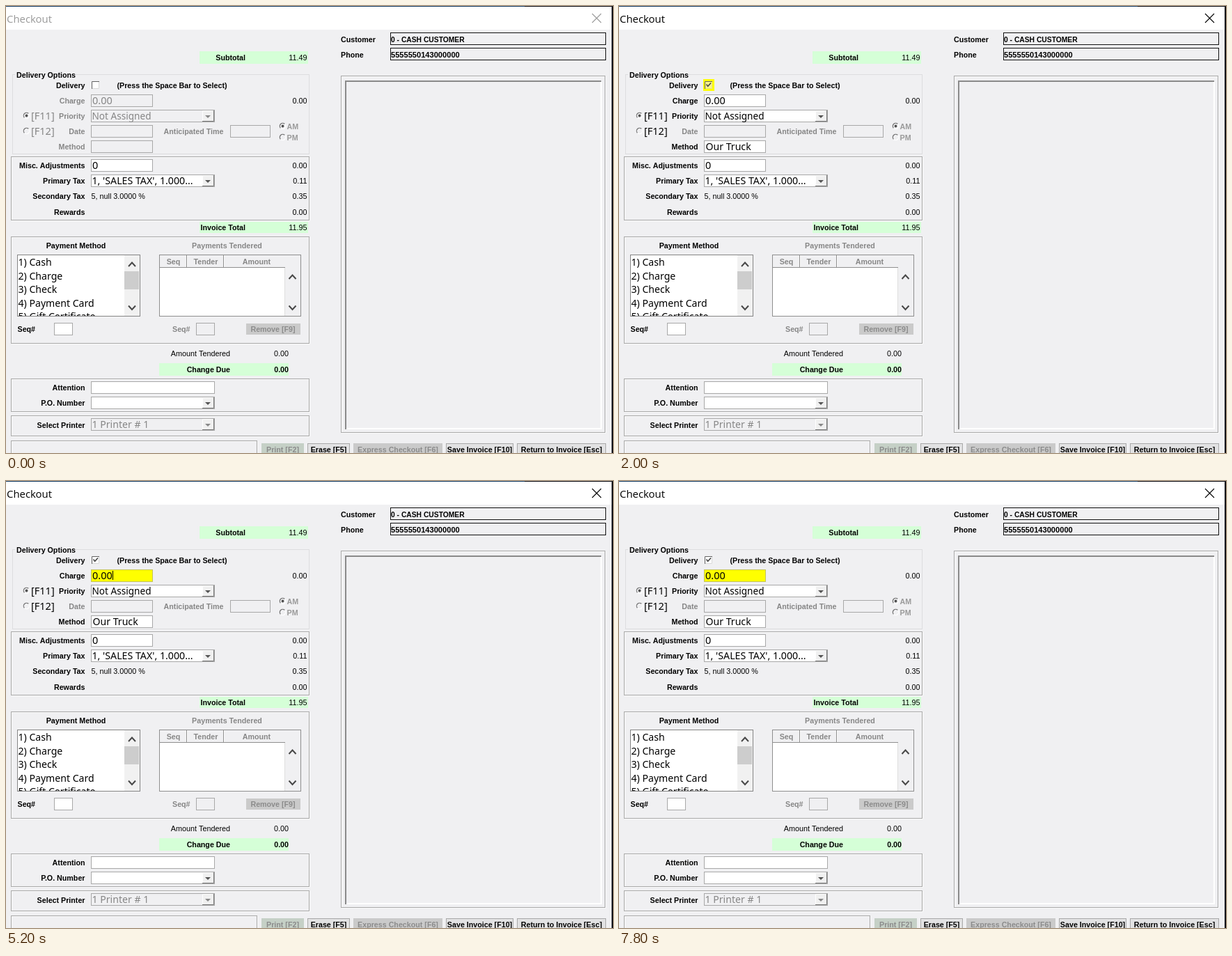
These frames come from a looping animation (872x642 px, 8000 ms). An HTML page with a canvas:

```html
<!DOCTYPE html>
<html lang="en">
<head>
<meta charset="utf-8">
<title>Checkout</title>
<style>
html, body { margin: 0; width: 872px; height: 642px; overflow: hidden; background: #f0f0f2; }
canvas { display: block; }
</style>
</head>
<body>
<canvas id="stage" width="872" height="642"></canvas>
<script>
const ctx = document.getElementById('stage').getContext('2d', { alpha: false });
const LOOP = 8000;
const BG = '#f0f0f2', GREEN = '#d5ffd7', INK = '#000', DIM = '#868686', EDGE = '#a8a8a8', YELLOW = '#ffff00';
const LABEL = '"Liberation Sans", Arial, sans-serif';
const FIELD = '"Noto Sans", "Open Sans", sans-serif';

function fill(x, y, w, h, color) {
  ctx.fillStyle = color;
  ctx.fillRect(x, y, w, h);
}

function frame(x, y, w, h, color) {
  ctx.strokeStyle = color;
  ctx.lineWidth = 1;
  ctx.strokeRect(x + 0.5, y + 0.5, w - 1, h - 1);
}

function path(points, color, width) {
  ctx.beginPath();
  points.forEach(([x, y], i) => i ? ctx.lineTo(x, y) : ctx.moveTo(x, y));
  ctx.strokeStyle = color;
  ctx.lineWidth = width;
  ctx.stroke();
}

function write(text, x, y, font, color, align) {
  ctx.font = font;
  ctx.fillStyle = color;
  ctx.textAlign = align;
  ctx.fillText(text, x, y);
}

const bold = (s, x, y, color = INK, align = 'left', size = 10.7) =>
  write(s, x, y, `bold ${size}px ${LABEL}`, color, align);
const plain = (s, x, y, color = INK, align = 'left') =>
  write(s, x, y, `10.8px ${LABEL}`, color, align);
const big = (s, x, y, color = INK, size = 14.1) =>
  write(s, x, y, `${size}px ${FIELD}`, color, 'left');
const label = (s, y, color) => bold(s, 113.5, y, color, 'right');
const amount = (s, y) => plain(s, 432.5, y, INK, 'right');

function group(x, y, w, h) {
  frame(x + 1, y + 1, w, h, '#fafafa');
  frame(x, y, w, h, EDGE);
}

function box(x, y, w, h, enabled, color = '#fff') {
  fill(x, y, w, h, enabled ? color : BG);
  frame(x, y, w, h, color === YELLOW ? '#c4c45a' : EDGE);
}

function combo(y, text, enabled, size) {
  box(122, y, 178, 18, enabled);
  fill(282, y + 1, 17, 16, '#f0f0f0');
  path([[282.5, y + 17], [282.5, y + 1.5], [298, y + 1.5]], '#fff', 1);
  path([[282, y + 16.5], [298.5, y + 16.5], [298.5, y + 1]], '#777', 1);
  ctx.fillStyle = enabled ? '#555' : '#888';
  ctx.beginPath();
  ctx.moveTo(286, y + 8);
  ctx.lineTo(294, y + 8);
  ctx.lineTo(290, y + 12);
  ctx.fill();
  big(text, 123.5, y + 14, enabled ? INK : DIM, size);
}

function radio(x, y, on) {
  ctx.lineWidth = 1.2;
  for (const [from, color] of [[0.75, '#707070'], [1.75, '#fff']]) {
    ctx.strokeStyle = color;
    ctx.beginPath();
    ctx.arc(x, y, 4.2, from * Math.PI, (from + 1) * Math.PI);
    ctx.stroke();
  }
  if (on) {
    ctx.fillStyle = '#505050';
    ctx.beginPath();
    ctx.arc(x, y, 1.9, 0, 7);
    ctx.fill();
  }
}

function chevron(x, y, dir) {
  path([[x - 5, y + 3 * dir], [x, y - 2.5 * dir], [x + 5, y + 3 * dir]], '#484848', 2);
}

function button(x, w, text, enabled, color = '#cacaca') {
  fill(x, 628, w, 14, enabled ? '#e2e2e3' : color);
  if (enabled) frame(x, 628, w, 20, '#a9a9a9');
  bold(text, x + w / 2, 641, enabled ? INK : '#8b8b8b', 'center');
}

function checkbox(focused, checked) {
  if (focused) fill(121, 105, 16, 17, YELLOW);
  fill(123, 108, 11, 11, !focused ? '#fff' : checked ? '#fbf58c' : YELLOW);
  path([[123.5, 119], [123.5, 108.5], [134, 108.5]], '#626262', 1);
  path([[124, 118.5], [133.5, 118.5], [133.5, 109]], focused ? '#e6e08a' : '#d8d8d8', 1);
  if (checked) path([[125.5, 112.5], [127.7, 115.2], [132, 110.5]], '#444', 1.6);
}

function header(active) {
  fill(0, 0, 872, 34, '#fff');
  const ink = active ? INK : '#999';
  write('Checkout', 1, 24, '14.9px "Open Sans", "Noto Sans", sans-serif', ink, 'left');
  path([[842, 11], [855, 24]], ink, 1.1);
  path([[855, 11], [842, 24]], ink, 1.1);
}

function delivery(s) {
  frame(9, 98, 427, 115, '#dddddf');
  fill(13, 94, 86, 10, BG);
  bold('Delivery Options', 15, 103);
  label('Delivery', 118);
  checkbox(s.focus === 'delivery', s.checked);
  bold('(Press the Space Bar to Select)', 159.5, 118);

  const ink = s.checked ? INK : DIM;
  label('Charge', 140, ink);
  box(122, 127, 89, 18, s.checked, s.focus === 'charge' ? YELLOW : '#fff');
  big('0.00', 124, 141, ink, 14.5);
  if (s.caret) fill(153, 129, 1, 13, INK);
  amount('0.00', 140);

  radio(29.5, 157.5, true);
  radio(29.5, 179.5, false);
  big('[F11]', 36, 163, ink, 14.5);
  big('[F12]', 36, 185, ink, 14.5);
  label('Priority', 162, ink);
  combo(149, 'Not Assigned', s.checked, 13.6);

  label('Date', 184, DIM);
  box(122, 171, 89, 18, false);
  bold('Anticipated Time', 312.5, 184, DIM, 'right');
  box(322, 171, 58, 18, false);
  radio(397.5, 172.5, true);
  radio(397.5, 188.5, false);
  bold('AM', 403.5, 177, '#9a9a9a');
  bold('PM', 403.5, 193, '#9a9a9a');

  label('Method', 206, ink);
  box(122, 193, 89, 18, s.checked);
  if (s.checked) big('Our Truck', 124.5, 207);
}

function totals() {
  fill(278, 65, 156, 18, GREEN);
  bold('Subtotal', 344, 78, INK, 'right');
  amount('11.49', 78);

  group(7, 216, 429, 92);
  label('Misc. Adjustments', 233);
  box(122, 220, 89, 18, true);
  big('0', 124, 234, INK, 14.5);
  amount('0.00', 233);
  label('Primary Tax', 255);
  combo(242, "1, 'SALES TAX', 1.000...", true, 14.2);
  amount('0.11', 255);
  label('Secondary Tax', 277);
  plain('5, null 3.0000 %', 122.5, 277);
  amount('0.35', 277);
  label('Rewards', 300);
  amount('0.00', 300);

  fill(278, 310, 156, 16, GREEN);
  bold('Invoice Total', 344, 322, INK, 'right');
  amount('11.95', 322);
}

function payments() {
  group(7, 331, 429, 154);
  bold('Payment Method', 100.5, 348, INK, 'center');
  bold('Payments Tendered', 317.5, 348, DIM, 'center');

  fill(16, 357, 177, 89, '#fff');
  ctx.save();
  ctx.beginPath();
  ctx.rect(17, 358, 152, 87);
  ctx.clip();
  ['Cash', 'Charge', 'Check', 'Payment Card', 'Gift Certificate'].forEach((name, i) =>
    big(`${i + 1}) ${name}`, 17.5, 373.4 + i * 19.4));
  ctx.restore();
  fill(170, 358, 22, 87, '#f1f1f1');
  fill(170, 381, 21, 26, '#cdcdcd');
  chevron(181, 371, 1);
  chevron(181, 433.5, -1);
  frame(16, 357, 177, 89, '#858585');

  fill(221, 376, 180, 69, '#fff');
  frame(220, 357, 204, 89, '#8e8e8e');
  path([[220, 375.5], [401, 375.5]], '#8e8e8e', 1);
  path([[400.5, 376], [400.5, 445]], '#dedede', 1);
  for (const x of [259.5, 312.5]) {
    path([[x, 358], [x, 375]], '#8e8e8e', 1);
    path([[x + 1, 358], [x + 1, 375]], '#fff', 1);
  }
  bold('Seq', 240.5, 371, DIM, 'center');
  bold('Tender', 287, 371, DIM, 'center');
  bold('Amount', 360, 371, DIM, 'center');
  chevron(411.5, 389, 1);
  chevron(411.5, 433.5, -1);

  bold('Seq#', 16.5, 468);
  box(69, 455, 27, 18, true);
  bold('Seq#', 239, 468, DIM);
  box(273, 455, 27, 18, false);
  fill(345, 456, 78, 16, '#cacaca');
  bold('Remove [F9]', 383.5, 468, '#8b8b8b', 'center');

  plain('Amount Tendered', 322, 503, INK, 'right');
  plain('0.00', 406, 503, INK, 'right');
  fill(220, 513, 186, 18, GREEN);
  bold('Change Due', 322, 526, INK, 'right');
  bold('0.00', 406, 526, INK, 'right');
}

function footer() {
  group(7, 535, 429, 48);
  label('Attention', 552);
  box(122, 539, 178, 18, true);
  label('P.O. Number', 574);
  combo(561, '', true);
  group(7, 588, 429, 30);
  label('Select Printer', 606);
  combo(592, '1 Printer # 1', false);
  group(7, 624, 354, 30);
  button(367, 61, 'Print [F2]', false, '#c5d0c6');
  button(433, 61, 'Erase [F5]', true);
  button(499, 128, 'Express Checkout [F6]', false);
  button(632, 97, 'Save Invoice [F10]', true);
  button(734, 128, 'Return to Invoice [Esc]', true);
}

function customer() {
  bold('Customer', 481, 52);
  bold('Phone', 481, 74);
  for (const y of [38, 60]) frame(552, y, 310, 18, '#111');
  bold('0 - CASH CUSTOMER', 553, 52, INK, 'left', 10.3);
  bold('5555550143000000', 553, 74, INK, 'left', 11.1);

  group(481, 100, 380, 513);
  path([[488, 608], [488, 108], [855, 108]], '#8a8a8a', 2);
  path([[489, 607], [855, 607], [855, 109]], '#fff', 2);
}

function edges() {
  fill(0, 0, 745, 1, '#123a63');
  fill(745, 0, 127, 1, '#0a0a10');
  fill(870, 0, 2, 642, '#15151a');
}

function caretOn(t) {
  // half-second blink from the moment the field takes focus
  return t >= 5200 && Math.floor((t - 5100) / 500) % 2 === 0;
}

function draw(t) {
  fill(0, 0, 872, 642, BG);
  const active = t >= 200;
  header(active);
  totals();
  delivery({
    checked: t >= 2000,
    focus: !active ? '' : t < 5200 ? 'delivery' : 'charge',
    caret: caretOn(t)
  });
  payments();
  footer();
  customer();
  edges();
}

const start = performance.now();
function tick(now) {
  draw(Math.max(0, now - start) % LOOP);
  requestAnimationFrame(tick);
}
draw(0);
requestAnimationFrame(tick);
</script>
</body>
</html>
```
